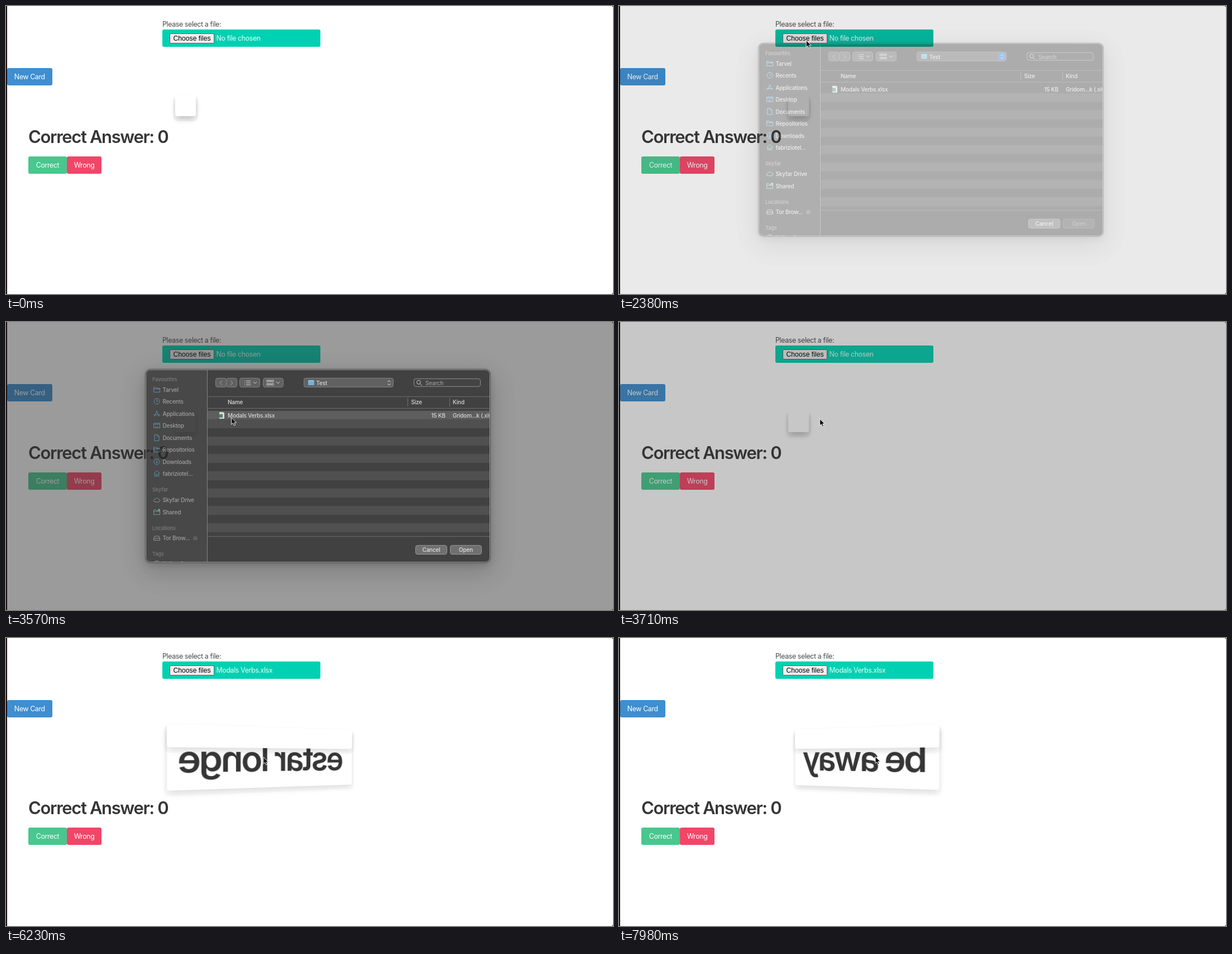
An HTML page that plays this animation: 1087x515 px, repeating every 8 s.

```html
<!DOCTYPE html>
<html lang="en">
<head>
<meta charset="utf-8">
<title>Flash cards</title>
<style>
html, body { margin: 0; width: 100%; height: 100%; overflow: hidden; background: #fff; }
body { position: relative; font: 12.4px Inter, sans-serif; letter-spacing: -.03em; color: #4a4a4a; }
div, span, svg { position: absolute; box-sizing: border-box; white-space: pre; }
span { line-height: 20px; }
svg { overflow: visible; fill: none; stroke: currentColor; }
#edge { inset: 0 0 0 2px; border-radius: 0 3px 3px 0; box-shadow: 0 0 0 9px #1a1014; }
.btn { display: grid; place-items: center; height: 31px; border-radius: 3px; color: #fff; }
#file { left: 280px; top: 41.5px; width: 282.5px; background: #00d1b2; }
#file.hot { background: #00c4a7; }
#new { left: 1.5px; top: 111px; width: 81.5px; background: #3e8ed0; }
#new.hot { background: #3082c5; }
#pick { left: 293px; top: 48.5px; width: 80px; height: 18.5px; border: 1px solid #666; border-radius: 2px;
  background: #efefef; color: #000; font: 12.2px/17px "Liberation Sans", sans-serif; letter-spacing: 0; text-align: center; }
.big { font-weight: 600; letter-spacing: -.045em; color: #363636; }
#score { left: 40px; top: 216px; font-size: 31px; line-height: 36px; }
#right { left: 40px; top: 269px; width: 69px; background: #48c78e; }
#wrong { left: 109px; top: 269px; width: 62px; background: #f14668; }
#card { left: 303px; top: 160px; min-height: 37px; padding: 18.5px; transform-style: preserve-3d; }
#card, #back { background: #fff; border-radius: 4px;
  box-shadow: 0 6px 12px -1.5px rgba(10,10,10,.12), 0 5px 0 4px rgba(10,10,10,.025); }
#back { left: 0; top: 0; width: 100%; height: 37px; transform: translateZ(-.5px); }
#word { position: relative; font-size: 62px; line-height: 69.5px; top: 2px; letter-spacing: -.055em; }
#dim { inset: 0; background: #2f2f2f; }
#sheet { left: 0; top: 0; width: 1087px; height: 515px; }
#glow, #dialog { left: 250px; top: 86px; width: 617px; height: 345px; border-radius: 9px; }
#glow { box-shadow: 0 0 0 1px #2a2a2a, 0 4px 14px rgba(0,0,0,.25), 0 14px 46px 6px rgba(0,0,0,.24); }
#dialog { overflow: hidden; background: #1e1e1e; color: #f2f2f2; font-size: 10px; font-weight: 500; letter-spacing: -.02em; }
#side { inset: 0; }
#rim { inset: 0; border: 1px solid #a8a8a8; border-radius: 9px; }
.ctl { border-radius: 4px; background: #4b4b4b; border: .7px solid #777; }
.push { width: 57px; height: 17px; top: 314px; border-radius: 4px; text-align: center; line-height: 15px;
  background: #606060; border: 1px solid #959595; color: #fff; }
#open { background: #343434; border-color: #505050; color: #858585; }
#step { background: #0a6fe8; border-radius: 3px; }
.head { color: #8f8f8f; font-size: 9.2px; font-weight: 600; }
.sel #open { background: #0a6fe8; border-color: #4c95ee; color: #fff; }
.sel #row { background: #0058d0; }
.off #open { background: #606060; border-color: #959595; }
.off #row { background: #464646; }
.off #step { background: none; }
.off #side { opacity: .6; }
</style>
</head>
<body>
<span style="left:280px;top:23px">Please select a file:</span>
<div id="file" class="btn"></div>
<div id="pick">Choose files</div>
<span id="name" style="left:376.5px;top:48px;color:#e8fffb"></span>
<div id="new" class="btn">New Card</div>
<div id="card"><div id="word" class="big"></div><div id="back"></div></div>
<div id="answer">
  <div id="score" class="big">Correct Answer: 0</div>
  <div id="right" class="btn">Correct</div>
  <div id="wrong" class="btn">Wrong</div>
</div>
<div id="dim"></div>
<div id="sheet"><div id="glow"></div><div id="dialog"></div></div>
<svg id="arrow" width="12" height="16"><path d="M0 0V12.2L2.8 9.7L4.8 14L7 13L5.1 8.9H8.8Z" fill="#111" stroke="#fff" stroke-width=".9"/></svg>
<svg id="hand" width="14" height="16"><path d="M-1.6 7V1.2q0-1.2 1.1-1.2t1.1 1.2V5q1.4-.8 2 .4q1.4-.5 1.9.6q1.7-.4 1.9 1.1V10L5.4 14H-.3L-4.6 8.2q.6-1.6 3 .4Z" fill="#fff" stroke="#111" stroke-width="1"/></svg>
<div id="edge"></div>
<script>
const $ = id => document.getElementById(id);
const dialog = $('dialog');

// Dialog parts; positions are relative to its top left corner
let host = dialog;
const add = html => host.insertAdjacentHTML('beforeend', html);
const box = (x, y, w, h, style = '', more = '') =>
  add(`<div ${more} style="left:${x}px;top:${y}px;width:${w}px;height:${h}px;${style}"></div>`);
const text = (x, y, s, more = '') => add(`<span ${more} style="left:${x}px;top:${y - 10}px">${s}</span>`);
const icon = (x, y, d, color = '#5ac8fa', scale = 1) =>
  add(`<svg width="12" height="12" viewBox="0 0 12 12" style="left:${x}px;top:${y - 6}px;color:${color};transform:scale(${scale})"><path d="${d}"/></svg>`);

const ring = 'M6 1a5 5 0 100 10a5 5 0 100-10';
const shape = {
  folder: 'M.5 2h4l1 1.5h6V10.5H.5zM.5 5h11',
  clock: ring + 'M6 3v3.2h2.4',
  apps: 'M6.5 1L2 11M5.5 1L10 11M0 8h12',
  desk: 'M.5 2h11v8.5H.5zM.5 4h11M3 8.3h6',
  doc: 'M2 .5h5l3 3v8H2zM7 .5v3h3',
  down: ring + 'M6 3v5.5M4 6.5l2 2 2-2',
  home: 'M.5 6L6 1l5.5 5M2.3 5v6h2.5V7.5h2.4V11h2.5V5',
  cloud: 'M3 10a2.4 2.4 0 010-4.8a3.2 3.2 0 016-.4a2.6 2.6 0 010 5.2z',
  disk: 'M.5 7l2-4h7l2 4v3.5H.5zM.5 7h11',
  chevron: 'M3 5l3 3 3-3',
  eject: 'M2 7l4-5 4 5zM2 9.5h8'
};

box(0, 0, 110, 345, 'background:#282828');
add('<div id="side"></div>');
host = $('side');
const place = (y, s, d, color) => { icon(14, y, shape[d], color); text(30.5, y, s); };
const head = (y, s) => text(12, y, s, 'class="head"');
head(18, 'Favourites');
[['Tarvel', 'folder'], ['Recents', 'clock'], ['Applications', 'apps'], ['Desktop', 'desk'], ['Documents', 'doc'],
 ['Repositorios', 'folder'], ['Downloads', 'down'], ['fabriziotel...', 'home']]
  .forEach(([s, d], i) => place(35.5 + 21.55 * i, s, d));
head(215, 'Skyfar');
place(233, 'Skyfar Drive', 'cloud', '#8fe3cf');
place(254.5, 'Shared', 'folder', '#8fe3cf');
box(22, 249, 4, 4, 'background:#8fe3cf;border-radius:2px');
head(283.5, 'Locations');
place(300.5, 'Tor Brow...', 'disk', '#ddd');
icon(83, 300.5, shape.eject, '#aaa', .9);
head(329.5, 'Tags');
place(347, 'Yellow 1', 'clock', '#ccc');
host = dialog;

box(110, 0, 1, 345, 'background:#777');
box(111, 47.5, 506, 1, 'background:#5a5a5a');
box(111, 69, 506, 1, 'background:#5a5a5a');
for (let i = 0; i < 7; i++) box(111, 89 + 31 * i, 506, 15.5, 'background:#333');
box(111, 298, 506, 1, 'background:#5a5a5a');
for (const x of [469, 544]) box(x, 51, 1, 15, 'background:#666');

const ctl = (x, w) => box(x, 15, w, 17, '', 'class="ctl"');
ctl(125, 19.5); ctl(144, 19.5); ctl(168, 37); ctl(209.5, 37); ctl(283, 161);
icon(129, 23.5, 'M8 2L4 6l4 4', '#aaa');
icon(148, 23.5, 'M4 2l4 4-4 4', '#aaa');
icon(176, 23.5, 'M1 2.5h1M4 2.5h8M1 6h1M4 6h8M1 9.5h1M4 9.5h8', '#eee');
icon(190, 23, shape.chevron, '#eee');
icon(217, 23.5, 'M0 1h3v3H0zM4.5 1h3v3h-3zM9 1h3v3H9zM0 7h3v3H0zM4.5 7h3v3h-3zM9 7h3v3H9z', '#ddd');
icon(231, 23, shape.chevron, '#eee');
box(291, 19, 11, 9, 'background:#5ebcf0;border-radius:1.5px;border-top:2px solid #8fd3f8');
text(305.5, 23.5, 'Test');
box(429, 17, 13, 13, '', 'id="step"');
icon(429.5, 23.5, 'M3.5 4.5L6 2l2.5 2.5M3.5 7.5L6 10l2.5-2.5', '#fff');
box(480, 15.5, 120, 15.5, 'border:1px solid #8a8a8a;border-radius:4px;background:#222');
icon(484, 23.5, 'M5 1.5a3.4 3.4 0 100 6.8a3.4 3.4 0 100-6.8M7.5 7.5L11 11', '#ddd');
text(501, 23.5, '<i style="font-style:normal;color:#999">Search</i>');

text(147, 58, 'Name'); text(475.5, 58, 'Size'); text(550, 58, 'Kind');
box(111, 73.5, 506, 15.5, '', 'id="row"');
box(132, 76, 9, 11.5, 'background:#f0f0f0;border-radius:1px 3px 1px 1px');
box(131.5, 79.5, 6, 6, 'background:#1f8a50');
text(147, 81.5, 'Modals Verbs.xlsx');
text(511.5, 81.5, '15 KB'); text(550, 81.5, 'Gridom...k (.xls');
add('<div class="push" style="left:483px">Cancel</div><div id="open" class="push" style="left:545px">Open</div><div id="rim"></div>');

// Keyframes: [time, value, ...]
const at = (keys, t) => {
  const i = keys.findIndex(k => k[0] > t);
  if (i < 0) return keys[keys.length - 1].slice(1);
  if (!i) return keys[0].slice(1);
  const a = keys[i - 1], b = keys[i], p = (t - a[0]) / (b[0] - a[0]);
  return a.slice(1).map((v, j) => v + (b[j + 1] - v) * p);
};
const pointer = [[490, 2, 98], [900, 180, 108], [1260, 352, 78], [1400, 360, 64], [2000, 340, 62], [2170, 335, 61],
  [2380, 335, 61], [2520, 363, 101], [2800, 398, 160], [3010, 404, 171], [3570, 404, 171], [3900, 300, 176],
  [4340, 92, 150], [4550, 70, 131], [5110, 70, 131], [5500, 160, 195], [5880, 325, 214], [6090, 440, 214],
  [6230, 461, 213], [7980, 459, 212]];
// opacity, vertical shift
const sheet = [[2310, 0, -30], [2380, .29, -19.5], [2450, .75, -8], [2520, 1, 0], [3000, 1, 0], [3080, 1, -1],
  [3500, 1, -1], [3570, .72, -1], [3640, .35, -8], [3710, 0, -18]];
const shade = [[2310, 0], [2380, .095], [2450, .32], [2520, .47], [3570, .48], [3640, .4], [3850, 0]];
const turn = [[5950, 0], [6090, -90], [6230, -167], [6370, -180], [6860, -180], [7040, -270], [7220, -360],
  [7580, -360], [7740, -450], [7880, -530], [7980, -553]];

function draw(t) {
  const [x, y] = at(pointer, t);
  const overNew = t >= 490 && x < 83 && y > 111 && y < 142;
  for (const [id, on] of [['arrow', !overNew], ['hand', overNew]]) {
    $(id).style.display = on && t >= 490 ? 'block' : 'none';
    $(id).style.transform = `translate(${x}px,${y}px)`;
  }
  $('new').classList.toggle('hot', overNew);
  $('file').classList.toggle('hot', t >= 1330 && t < 2450);
  $('name').textContent = t < 3780 ? 'No file chosen' : 'Modals Verbs.xlsx';

  const dealt = t >= 4830;
  $('word').textContent = !dealt ? '' : t >= 6090 && t < 7740 ? 'estar longe' : 'be away';
  $('answer').style.top = (dealt ? 69.5 : 0) + 'px';
  $('card').style.transform = `perspective(370px) rotateY(${at(turn, t)}deg)`;

  const [opacity, shift] = at(sheet, t);
  $('sheet').style.opacity = opacity;
  $('sheet').style.transform = `translateY(${shift}px)`;
  dialog.classList.toggle('sel', t >= 3290);
  dialog.classList.toggle('off', t >= 3500);
  $('dim').style.opacity = at(shade, t);
}

const start = performance.now();
function loop() {
  draw((performance.now() - start) % 8000);
  requestAnimationFrame(loop);
}
loop();
</script>
</body>
</html>
```
